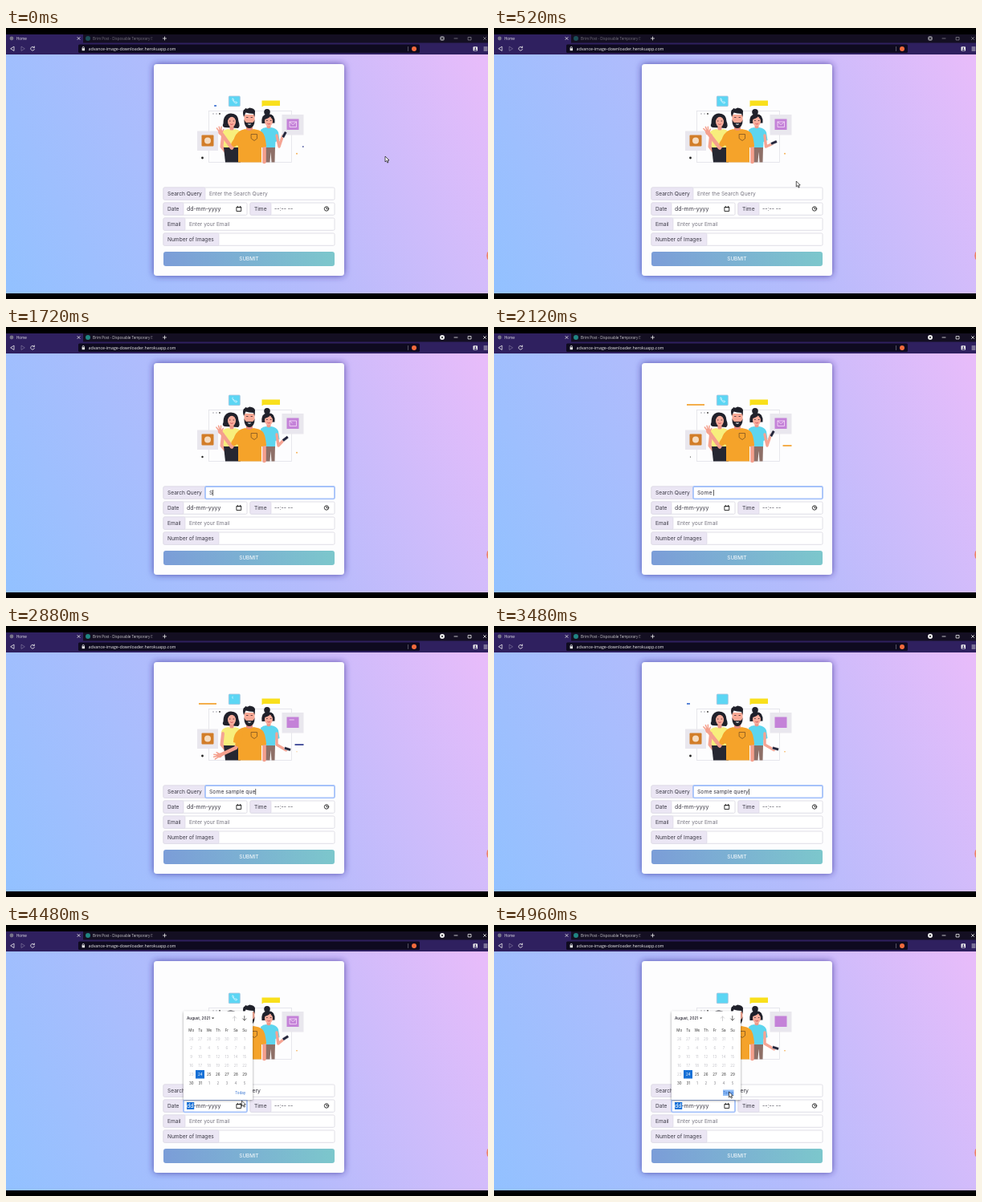
Animation of 600 by 338 pixels, one loop 5000 ms. Source, as an HTML page:

```html
<!DOCTYPE html>
<html lang="en">
<head>
<meta charset="utf-8">
<title>Search form</title>
<style>
  html, body { margin: 0; height: 100%; overflow: hidden; background: #000; }
  svg { display: block; width: 100vw; height: 100vh; }
  text { font: 6.6px Inter, sans-serif; fill: #3a3844; white-space: pre; }
  .chrome text { font: 4.5px "Open Sans", sans-serif; fill: #eee; }
  .chrome .url { font-size: 5.3px; }
  .hint { fill: #777580; }
  .cal text { font-size: 4.5px; text-anchor: middle; }
  .line { fill: none; stroke-linecap: round; stroke-linejoin: round; }
</style>
</head>
<body>
<svg viewBox="0 0 600 338" preserveAspectRatio="none">
  <defs>
    <linearGradient id="page" gradientUnits="userSpaceOnUse" x1="4" y1="339" x2="596" y2="25">
      <stop stop-color="#92c1ff"/><stop offset=".5" stop-color="#b4bbfc"/><stop offset="1" stop-color="#e9bcfa"/>
    </linearGradient>
    <linearGradient id="button"><stop stop-color="#7b9dd8"/><stop offset="1" stop-color="#7cc7cc"/></linearGradient>
    <linearGradient id="tabFade"><stop stop-color="#140f22" stop-opacity="0"/><stop offset="1" stop-color="#140f22"/></linearGradient>
    <filter id="glow" x="-20%" y="-20%" width="140%" height="140%">
      <feDropShadow dx="0" dy="0" stdDeviation="4" flood-color="#32288f" flood-opacity=".75"/>
    </filter>
    <filter id="soft"><feDropShadow dx="0" dy="1" stdDeviation="1.5" flood-opacity=".4"/></filter>
  </defs>

  <rect width="600" height="338"/>
  <rect y="33" width="600" height="298" fill="url(#page)"/>

  <g class="chrome">
    <rect y="8" width="600" height="11" fill="#140f22"/>
    <path d="M0 8H96V18.500H600V33H0Z" fill="#2f205f"/>
    <rect x="90" y="20.500" width="425" height="10.500" rx="1.500" fill="#0e0a1f"/>
    <circle cx="7" cy="13" r="2.400" fill="#77738a"/>
    <text x="13" y="14.500">Home</text>
    <g id="tab">
      <circle cx="102" cy="13" r="3" fill="#239a93"/>
      <text x="108" y="14.500">Brim Post - Disposable Temporary E</text>
    </g>
    <rect x="176" y="9" width="14" height="9" fill="url(#tabFade)"/>
    <g class="line" stroke="#eee" stroke-width=".8">
      <path d="M89 11.500l3 3m0-3l-3 3M195.500 13h4m-2-2v4"/>
      <path d="M10 23.500v5l-4-2.500Z"/>
      <path d="M19 23.500v5l4-2.500Z" opacity=".35"/>
      <path d="M35 24.200a2.400 2.400 0 1 0 .4 2.400M35.400 23v1.700h-1.700"/>
      <path d="M595 24h4M595 26h4M595 28h4"/>
      <path d="M95.200 25.500v-1a1.100 1.100 0 0 1 2.200 0v1"/>
      <path d="M500.500 23.500v5" opacity=".4"/>
    </g>
    <rect x="94.600" y="25.300" width="3.400" height="2.900" fill="#eee"/>
    <text class="url" x="102.500" y="27.800">advance-image-downloader.herokuapp.com</text>
    <circle cx="508" cy="26" r="3" fill="#f06a3c"/>
    <rect x="581.500" y="23.200" width="5.500" height="5.500" rx="1" fill="#eee"/>
    <path d="M582.600 28.200a1.700 1.700 0 0 1 3.400 0Z" fill="#2f205f"/>
    <circle cx="584.300" cy="25.200" r=".9" fill="#2f205f"/>
    <g id="windowButtons">
      <circle cx="543" cy="13" r="3" fill="#eee"/><circle cx="543" cy="13" r="1" fill="#222"/>
      <path class="line" d="M558 13h4M575.500 11.500h3.500v3.500h-3.500ZM594.500 11.500l3 3m0-3l-3 3" stroke="#eee" stroke-width=".8"/>
    </g>
  </g>
  <path d="M600 279.500h-1q-1.500 4.500 0 9h1Z" fill="#ef8263"/>

  <rect x="184" y="45" width="237" height="264" rx="4" fill="#fdfdfe" filter="url(#glow)"/>

  <g id="scene">
    <rect x="252.500" y="103.500" width="103" height="64" fill="none" stroke="#e2e1e8" stroke-width=".8"/>
    <g fill="#8c8a96"><circle cx="258" cy="107" r=".7"/><circle cx="262" cy="107" r=".7"/><circle cx="266" cy="107" r=".9" fill="#333"/></g>
    <rect x="238" y="128.500" width="26" height="24.500" fill="#e9e7ee"/>
    <rect x="243.500" y="133.500" width="15" height="14" rx="1" fill="#d27d28"/>
    <circle cx="251" cy="140.500" r="4" fill="#f6dcc0"/>
    <rect x="343.500" y="108" width="27" height="25.500" fill="#e9e7ee"/>
    <rect x="349.500" y="113.500" width="15" height="13.500" fill="#c482d8"/>
    <rect x="277.300" y="85" width="14" height="12.700" rx="1" fill="#5cd6f4" stroke="#a8c5dd" stroke-width=".8"/>
    <path d="M318.500 90.500H341V97H321l-2.500 1.200Z" fill="#f9e01c"/>
    <path id="phoneIcon" class="line" pathLength="1" stroke-dasharray="1" d="M282 88q-1 1 1 3.500q2.500 3 4 2.500l.7-1.300l-1.700-1l-1 .6q-1.500-1-2-2.300l.8-.8Z" stroke="#d8f7ff" stroke-width=".8"/>
    <path id="mailIcon" class="line" pathLength="1" stroke-dasharray="1" d="M353 117h8.500v6.500H353V117l4.200 3.700l4.300-3.700" stroke="#f7def9" stroke-width=".8"/>
    <g id="swooshes" class="line" stroke-width="1.700"></g>
    <circle id="leftDot" cx="244.500" cy="162" fill="#222"/>
    <circle id="rightDot" cx="362" cy="156.700" fill="#f3a43a"/>

    <!-- woman on the left -->
    <path d="M272 124q-3.500-1-1.500-5q0-12 9.500-12.500q9 0 9.500 10q2.500 6-.5 8.500Z" fill="#20212b"/>
    <path d="M278.500 120h5v8h-5Z" fill="#ee9888"/>
    <ellipse cx="281" cy="117" rx="5" ry="6.300" fill="#f8ad9c"/>
    <path d="M275.500 116q2-5.500 6-6q4 1 5.500 5.500l.5-5l-7-3l-6 4Z" fill="#20212b"/>
    <path d="M268 132q1-5 9-6q4 3 8 0q6 1 8 5v19h-22Z" fill="#f8ee7c"/>
    <path class="line" d="M270 134l-1.500 14l4 5" stroke="#f5a493" stroke-width="4"/>
    <path d="M271 149h21v18.500h-19Z" fill="#262731"/>

    <!-- woman on the right -->
    <circle cx="325" cy="104.800" r="3.800" fill="#20212b"/>
    <path d="M318.500 119q-1.500-11.500 8-12q9 .5 8 11.500Z" fill="#20212b"/>
    <path d="M324.500 119h5v7h-5Z" fill="#ee9888"/>
    <ellipse cx="327" cy="116.300" rx="5" ry="6.200" fill="#f8ad9c"/>
    <path d="M321 114q6-1 8-4q1 3 4 4l-1-5l-6-1.500l-4 2.500Z" fill="#20212b"/>
    <path d="M317 127q3-3 7-3q3 2.500 6 0q7 1 9 6l1.500 10l-5 2l-.5 8h-16Z" fill="#5dd5ee"/>
    <path d="M320 149h15l-.5 18.500h-4l-1-13l-1 13h-6Z" fill="#8e7068"/>
    <path id="phoneArm" class="line" stroke="#f5a493" stroke-width="3.400"/>
    <rect id="phone" x="-1.700" y="-4" width="3.400" height="8" rx=".7" fill="#23243a" stroke="#fff" stroke-width=".4"/>

    <!-- man in the middle -->
    <path id="forearm" class="line" stroke="#f5a08d" stroke-width="4.600"/>
    <g id="hand">
      <ellipse rx="2.800" ry="3.300" fill="#f5a08d"/>
      <path class="line" d="M-1.500-1l-2.500-4.500M-.3-2l-.8-5M1-2l.9-4.600M2 0l2.200-3" stroke="#f5a08d" stroke-width="1.500"/>
    </g>
    <path class="line" d="M321.500 145V167" stroke="#f5a08d" stroke-width="4.600" stroke-linecap="butt"/>
    <path d="M299 118h8v9l-4 3l-4-3Z" fill="#e98d7b"/>
    <path d="M289 130q3-3 9-4q5 4 10 0q8 1 11 4q4 3 5 18l-6 1v18.500h-29V147l-6-2q0-10 6-15Z" fill="#f5a32a"/>
    <path id="sleeve" class="line" stroke="#f5a32a" stroke-width="7"/>
    <path class="line" d="M305.500 132.500h7v5.500l-3.500 2.500l-3.500-2.500Z" stroke="#6d4921" stroke-width=".7"/>
    <path d="M296.500 108h13v8q-1 7-6.500 7.500q-6-.5-6.500-7.500Z" fill="#f8a995"/>
    <path d="M296 111q-2-6 0-9q1.500 0 2-2q3 1.500 5-.5q6 .5 7 4q0 5-.7 7.500l-1.300-4q-6-.5-9.500-1.500Z" fill="#20212b"/>
    <path d="M296.500 114q1.500 4 3 4h7q2 0 3-4l-.3 5q-2 6-6.200 6q-4.500 0-6.200-6Z" fill="#20212b"/>
    <path d="M300.500 119.500h5q-2.500 2.700-5 0Z" fill="#fff"/>
    <g class="line" stroke="#3b2830" stroke-width=".8">
      <path d="M299.500 111.500h1.500M305 111.500h1.500M278.300 116h.8M283 116h.8M324.500 115.500h.8M329.200 115.500h.8"/>
      <path d="M279.500 120q1.500 1.200 3 0M325.700 119.500q1.500 1.200 3 0" stroke="#c84350"/>
    </g>
  </g>

  <g id="form"></g>
  <text id="query" x="253" y="209" style="font-size:6.800px"></text>
  <rect id="caret" y="203" width=".7" height="7.500" fill="#222"/>
  <rect id="selection" x="225" y="221" width="9.200" height="9" fill="#1a73d8"/>
  <text id="dateHint" x="225" y="228" style="font-size:6.900px"><tspan id="day">dd</tspan>-mm-yyyy</text>
  <text x="334" y="228" style="font-size:7px">--:-- --</text>
  <g class="line" stroke="#222" stroke-width=".9">
    <path d="M287.300 223.500h5.400v5h-5.400ZM287.300 223.700h5.400M288.300 222.300v1M291.700 222.300v1"/>
    <circle cx="399" cy="225.500" r="2.700"/><path d="M399 224v1.700h1.300"/>
  </g>
  <rect x="196" y="279" width="213" height="18" rx="3" fill="url(#button)"/>
  <text x="302.500" y="290.200" text-anchor="middle" style="fill:#fff;font-size:6.300px">SUBMIT</text>

  <g id="calendar" class="cal">
    <rect x="221" y="107.500" width="86" height="110.500" rx="1" fill="#fff" filter="url(#soft)"/>
    <text x="225" y="118" style="text-anchor:start;font-weight:600;font-size:4.600px">August, 2021</text>
    <path d="M256 115.500h3.200l-1.600 1.800Z" fill="#333"/>
    <g class="line" stroke-width=".8">
      <path d="M284.500 119.500v-5.500m-2.200 2.200l2.200-2.200l2.200 2.200" stroke="#c4c4c8"/>
      <path d="M296.800 113.500v5.500m-2.200-2.200l2.200 2.200l2.200-2.200" stroke="#444"/>
    </g>
    <rect x="236" y="181" width="11" height="10.500" fill="#1670d6"/>
    <g id="days"></g>
    <rect id="todayBox" x="285" y="205.500" width="13.500" height="7.500" fill="#8fbcf6"/>
    <text x="291.700" y="210.900" style="fill:#2f6fd0">Today</text>
  </g>
  <path id="cursor" d="M0 0v7l1.600-1.500l1.200 2.600l1.200-.6l-1.200-2.500h2.200Z" fill="#fff" stroke="#111" stroke-width=".7"/>
</svg>

<script>
const LOOP = 5000, FOCUS = 800, OPEN = 4280;
const QUERY = 'Some sample query';
const el = id => document.getElementById(id);
const set = (id, attrs) => { for (const k in attrs) el(id).setAttribute(k, attrs[k]); };
const show = (id, on) => set(id, { visibility: on ? 'visible' : 'hidden' });
const mix = (a, b, p) => a + (b - a) * p;
const clamp = p => Math.min(1, Math.max(0, p));
const ease = p => p * p * (3 - 2 * p);

// Eased value at time t along [time, value] pairs
function keys(t, ...points) {
  const i = points.findIndex(p => p[0] > t);
  if (i < 0) return points[points.length - 1][1];
  if (i === 0) return points[0][1];
  const [t0, a] = points[i - 1], [t1, b] = points[i];
  return mix(a, b, ease((t - t0) / (t1 - t0)));
}

// Fields: label, hint, left, label end, right, top
const fields = [
  ['Search Query', 'Enter the Search Query', 196, 248, 409, 199],
  ['Date', '', 196, 221, 300, 218],
  ['Time', '', 304, 330, 409, 218],
  ['Email', 'Enter your Email', 196, 223, 409, 237],
  ['Number of Images', '', 196, 265, 409, 256],
];
el('form').innerHTML = fields.map(([label, hint, x, split, end, y], i) => `
  <rect x="${x}" y="${y}" width="${end - x}" height="15.300" rx="1.500" fill="#fff" stroke="#d9d7e0" stroke-width=".8"/>
  <rect x="${x}" y="${y}" width="${split - x}" height="15.300" rx="1.500" fill="#ebe6f4" stroke="#d9d5e2" stroke-width=".6"/>
  <rect id="ring${i}" x="${split}" y="${y}" width="${end - split}" height="15.300" rx="1.500" fill="#fff" stroke="#a5c2fa" stroke-width="1.800" visibility="hidden"/>
  <text x="${x + 5}" y="${y + 10}">${label}</text>
  <text id="hint${i}" class="hint" x="${split + 5}" y="${y + 10}">${hint}</text>`).join('');

const cell = (label, col, y, fill) => `<text x="${230.7 + col * 11.05}" y="${y}" style="fill:${fill}">${label}</text>`;
let days = ['Mo', 'Tu', 'We', 'Th', 'Fr', 'Sa', 'Su'].map((d, i) => cell(d, i, 132.7, '#333')).join('');
for (let i = 0; i < 42; i++) {
  const date = new Date(2021, 6, 26 + i).getDate();
  const fill = i < 29 ? '#c2c2c8' : i === 29 ? '#fff' : i < 37 ? '#333' : '#85858c';
  days += cell(date, i % 7, 143.7 + Math.floor(i / 7) * 11.05, fill);
}
el('days').innerHTML = days;

// Strokes that grow in and shrink out: x, length, y, colour, in start, in end, out start, out end
const BLUE = '#2f3a8f', ORANGE = '#f3a02c';
const swooshes = [
  [240, 22, 97, '#3b6fd0', -400, -300, -200, 60],
  [240, 22, 97, ORANGE, 980, 1300, 1350, 1650],
  [240, 22, 97, ORANGE, 1800, 2050, 2900, 3200],
  [240, 22, 97, '#3b6fd0', 3400, 3700, 3820, 4110],
  [359.5, 11, 148, BLUE, -400, -300, -200, 60],
  [359.5, 11, 148, ORANGE, 1850, 2080, 2300, 2500],
  [359.5, 11, 148, BLUE, 2600, 2800, 3000, 3300],
  [359.5, 11, 148, BLUE, 3500, 3700, 3820, 4110],
];

function drawScene(t) {
  const phase = t % 2000;
  const icons = keys(phase, [0, 1], [650, 1], [880, .13], [940, 0], [1500, 0], [1800, 1]);
  for (const id of ['phoneIcon', 'mailIcon'])
    set(id, { 'stroke-dashoffset': 1 - icons, opacity: icons ? 1 : 0 });

  el('swooshes').innerHTML = swooshes.map(([x, len, y, colour, a, b, c, d]) => {
    const from = ease(clamp((t - c) / (d - c))), to = ease(clamp((t - a) / (b - a)));
    return to > from ? `<path d="M${x + len * from} ${y}H${x + len * to}" stroke="${colour}" stroke-linecap="butt"/>` : '';
  }).join('');
  set('leftDot', { r: keys(t, [1000, 1.4], [1720, 1.2], [2120, .6], [2700, 1.4]) });
  set('rightDot', { r: keys(t, [1800, .9], [2050, 0], [2300, 0], [2880, .5], [3600, .8]) });

  const down = keys(phase, [250, 0], [800, 1], [1450, 1], [1880, 0]);
  const px = mix(346.5, 350.5, down), py = mix(133, 153.3, down);
  set('phoneArm', { d: `M337 134L${mix(340, 337, down)} 148L${px - 2} ${py + 1.5}` });
  set('phone', { transform: `translate(${px} ${py}) rotate(${mix(28, 108, down)})` });

  const low = keys(t, [2300, 0], [2750, 1], [3050, 1], [3500, 0]);
  const wave = (1 - low) * Math.sin(phase / 1000 * Math.PI - Math.PI / 2);
  const hx = mix(266, 265.5, low) - wave, hy = mix(130, 161.5, low);
  const ex = mix(281, 286, low), ey = mix(149.5, 152, low);
  set('forearm', { d: `M${ex + 2} ${ey - 4}L${ex} ${ey}L${hx} ${hy}` });
  set('hand', { transform: `translate(${hx} ${hy}) rotate(${mix(-12, -95, low) - wave * 6})` });
  set('sleeve', { d: `M291 134L${ex + 3} ${ey - 5}` });
}

function drawForm(t) {
  const typing = t >= FOCUS && t < OPEN, open = t >= OPEN;
  const count = t < 1680 ? 0 : t < 2080 ? 1 + Math.floor((t - 1680) / 100) : 5 + Math.floor((t - 2080) / 77);
  el('query').textContent = QUERY.slice(0, count);
  show('hint0', count === 0);
  show('ring0', typing);
  show('ring1', open);
  show('selection', open);
  el('day').style.fill = open ? '#fff' : '';
  const blinkStart = t < 1680 ? FOCUS : 3050;
  const typingNow = t >= 1680 && t < 3050;
  show('caret', typing && (typingNow || (t - blinkStart) % 1000 < 500));
  set('caret', { x: 253 + (count ? el('query').getComputedTextLength() : 0) });
  show('calendar', open);
  show('todayBox', t > 4620);
}

function drawPointer(t) {
  show('cursor', t < FOCUS + 60 || t > 3500);
  const x = keys(t, [150, 472], [750, 330], [3500, 330], [4000, 294], [4320, 294], [4700, 292.5]);
  const y = keys(t, [150, 160], [750, 206], [3500, 206], [4000, 226], [4320, 226], [4700, 208]);
  set('cursor', { transform: `translate(${x} ${y})` });
  const active = t >= FOCUS;
  set('tab', { opacity: active ? .85 : .45 });
  set('windowButtons', { opacity: active ? 1 : .5 });
}

const start = performance.now();
function frame() {
  const t = (performance.now() - start) % LOOP;
  drawScene(t);
  drawForm(t);
  drawPointer(t);
  requestAnimationFrame(frame);
}
frame();
</script>
</body>
</html>
```
